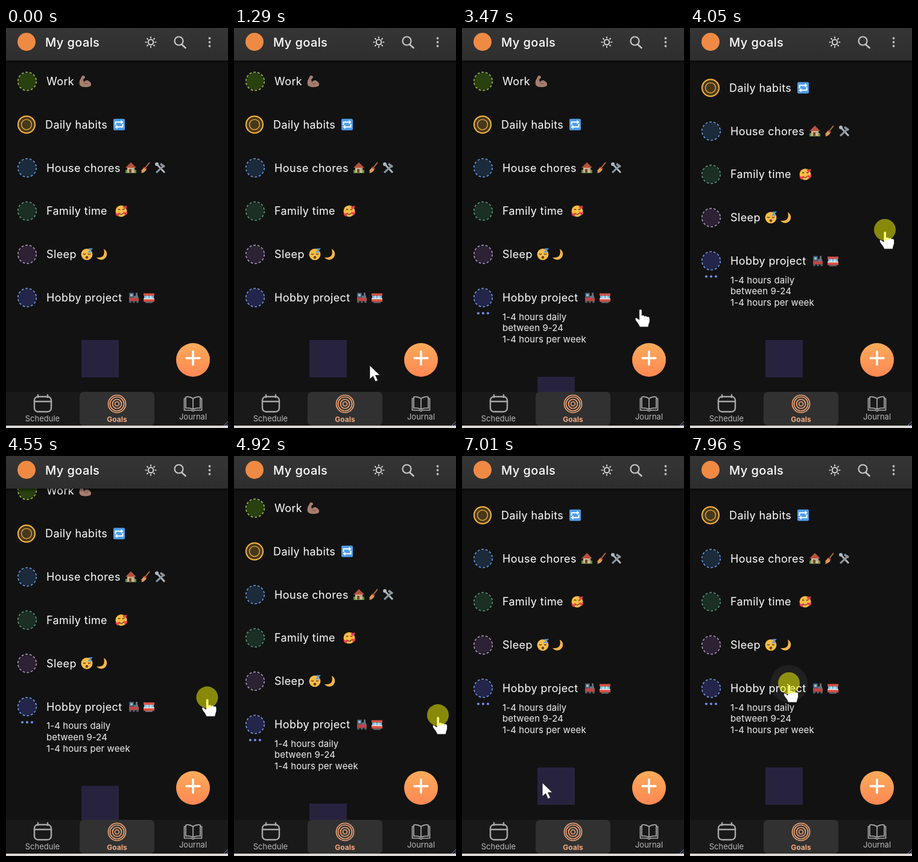
These frames come from a looping animation (368x664 px, 8000 ms). An HTML page:

```html
<!DOCTYPE html>
<html lang="en">
<head>
<meta charset="utf-8">
<title>My goals</title>
<style>
html, body { margin: 0; width: 100%; height: 100%; overflow: hidden; background: #121212; }
svg { display: block; width: 368px; height: 664px; }
text { font-family: Inter, "Open Sans", sans-serif; fill: #fff; }
.name { font-size: 18px; letter-spacing: .4px; }
.detail { font-size: 15px; letter-spacing: .1px; fill: #f0f0f0; }
.tab { font-size: 13px; fill: #b9b9b9; text-anchor: middle; }
.line { fill: none; stroke-linecap: round; stroke-linejoin: round; }
</style>
</head>
<body>
<svg viewBox="0 0 368 664">
  <defs>
    <linearGradient id="warm" x1="0" y1="0" x2="0" y2="1">
      <stop offset="0" stop-color="#fbab5a"/><stop offset="1" stop-color="#ff8753"/>
    </linearGradient>
    <linearGradient id="bar" x1="0" y1="0" x2="0" y2="1">
      <stop offset="0" stop-color="#353535"/><stop offset="1" stop-color="#2e2e2e"/>
    </linearGradient>
    <linearGradient id="shade" x1="0" y1="0" x2="0" y2="1">
      <stop offset="0" stop-color="#000" stop-opacity=".45"/><stop offset="1" stop-color="#000" stop-opacity="0"/>
    </linearGradient>
  </defs>
  <rect width="368" height="664" fill="#121212"/>
  <rect id="mark" x="125" y="518" width="62" height="62" fill="#27233f"/>
  <g id="list"></g>

  <circle cx="310" cy="551" r="28" fill="url(#warm)"/>
  <path class="line" d="M299 548H321M310 537V559" stroke="#fff" stroke-width="3.4"/>

  <rect y="54" width="368" height="6" fill="url(#shade)"/>
  <rect width="368" height="54" fill="url(#bar)"/>
  <circle cx="34" cy="23" r="15" fill="#ef8a45"/>
  <text x="65" y="31" font-size="20" font-weight="500" letter-spacing=".4">My goals</text>
  <g class="line" stroke="#eee" stroke-width="1.7">
    <circle cx="240" cy="23.5" r="4.3"/>
    <path id="rays"/>
  </g>
  <path class="line" d="M292 28L297.500 33" stroke="#c8c8c8" stroke-width="2.6"/>
  <circle class="line" cx="286.500" cy="21.500" r="7" stroke="#c8c8c8" stroke-width="2.2"/>
  <path class="line" d="M337.500 17v0M337.500 23.500v0M337.500 30v0" stroke="#bbb" stroke-width="3.800"/>

  <rect y="604" width="368" height="56" fill="#191919"/>
  <rect x="122" y="604" width="124" height="56" rx="7" fill="#313131"/>
  <g class="line" stroke="#a9a9a9" stroke-width="2.4">
    <rect x="47" y="612" width="28" height="25" rx="6"/>
    <path d="M47 620H75M53 609V613M69 609V613"/>
  </g>
  <g class="line" stroke="#f4a878" stroke-width="1.7">
    <circle cx="184" cy="624" r="14.5"/><circle cx="184" cy="624" r="11.5"/>
    <circle cx="184" cy="624" r="7.5"/><circle cx="184" cy="624" r="3.5"/>
  </g>
  <g class="line" stroke="#b0b0b0" stroke-width="1.6">
    <path d="M310 615Q304 611 298 612.500V631Q304 630 310 633Q316 630 322 631V612.500Q316 611 310 615V633"/>
    <path d="M298 615H295.500V634.500H307L310 636L313 634.500H324.500V615H322"/>
  </g>
  <text class="tab" x="60.500" y="653">Schedule</text>
  <text class="tab" x="184" y="654" style="font-size:12px;font-weight:700;fill:#f7aa80">Goals</text>
  <text class="tab" x="310" y="650">Journal</text>
  <path d="M361 660L368 653M365 660L368 657" stroke="#8589c8"/>
  <rect y="660" width="368" height="4" fill="#dcd8d6"/>

  <g id="cursor">
    <circle id="ripple" r="31" fill="#fff"/>
    <path id="arrow" d="M0 0V23L5.500 18L9.500 27L13.500 25L9.500 16.500H17Z" fill="#fff" stroke="#111" stroke-width=".8"/>
    <path id="hand" d="M-2 3Q0 0 2.500 3V12Q5 10 7 13Q9.500 11.500 11 14Q15 13 15.500 17V22Q14 26 13 31H-1Q-3 26 -8 20Q-10 15 -6 16L-2 19Z"
      fill="#fff" stroke="#111" stroke-width=".8"/>
    <circle id="press" cy="-1" r="18" fill="#ff0" fill-opacity=".5"/>
  </g>
</svg>
<script>
const $ = id => document.getElementById(id);

// Pictograms, each about 20px wide around its own centre
const face = '<circle r="9.500" fill="#f9bd45"/>';
const heart = (x, y) => `<path d="M${x} ${y + 3}l-3-3q-1-3 1.500-3l1.500 1.500l1.500-1.500q2.500 0 1.500 3z" fill="#ef3f4e"/>`;
const wheels = '<path d="M-6 7v0M0 7v0M6 7v0" stroke="#555f6b" stroke-width="4" stroke-linecap="round"/>';
const art = {
  arm: '<path d="M-6-9q5-2 5 3l-3 3l1 4q5-5 9-1q5 4 2 8q-6 3-14 1q-6-2-4-10z" fill="#a67d6e"/><path d="M-3 2q3 4 7 1" fill="none" stroke="#795448"/>',
  repeat: '<rect x="-9.500" y="-9.500" width="19" height="19" rx="2" fill="#4d9dea"/><path d="M-6 1v-5h10M6-1v5h-10" fill="none" stroke="#fff" stroke-width="2"/><path d="M3-7.500l4 3.500l-4 3.500zM-3 .5l-4 3.500l4 3.500z" fill="#fff"/>',
  house: '<path d="M-9 4q9-5 18 0v5h-18z" fill="#5d8f43"/><path d="M-6-1h12v9h-12z" fill="#d8b38a"/><path d="M-9 0l9-9l9 9z" fill="#b5533c"/><path d="M-3 2h4v6h-4z" fill="#6d4738"/><path d="M3 1h2v3h-2z" fill="#69a9c8"/>',
  broom: '<path d="M7-9l-8 10" stroke="#a86b42" stroke-width="2"/><path d="M-2-1l4 3q-2 6-9 7q2-3 0-4z" fill="#df9a55"/><path d="M-2-1l4 3" stroke="#c0473f" stroke-width="2"/>',
  tools: '<path d="M-7-7L7 8" stroke="#aeb9c2" stroke-width="3"/><path d="M6-4L-7 8" stroke="#8b97a1" stroke-width="3"/><path d="M1-8l7 5l-2 3l-7-5z" fill="#8b97a1"/><circle cx="-6" cy="-6" r="3" fill="#aeb9c2"/>',
  love: face + '<path d="M-5-2q2-2 3 0M2-2q2-2 3 0M-4 3q4 5 8 0" fill="none" stroke="#663d2b" stroke-width="1.500"/>' + heart(-6, 6) + heart(7, 4) + heart(6, -6),
  sleepy: face + '<path d="M-6-1q2 2 4 0M2-1q2 2 4 0" fill="none" stroke="#663d2b" stroke-width="1.300"/><circle cy="5" r="2.300" fill="#663d2b"/><path d="M3-9h5l-5 5h5" fill="none" stroke="#4d9dea" stroke-width="1.800"/>',
  moon: '<path d="M3-9A9.500 9.500 0 1 1-9 5Q7 7 3-9z" fill="#f6b64b"/>',
  train: '<path d="M-8-8h8v9h-8z" fill="#475768"/><path d="M-6-6h4v4h-4z" fill="#8ac0dc"/><path d="M-8 0h16v6h-16z" fill="#c24545"/><path d="M0-3h7v4h-7zM3-8h3v5h-3z" fill="#67727d"/>' + wheels,
  tram: '<path d="M-9-7h18v4h-18z" fill="#d95145"/><path d="M-8-3h16v5h-16z" fill="#80bfe3"/><path d="M-9 2h18v5h-18z" fill="#d95145"/><path d="M-9 2h18M-3-3v5M3-3v5" stroke="#eee" stroke-width="1.500"/><path d="M-6 8h12" stroke="#65717c" stroke-width="2"/>'
};

// name, fill, ring, pictograms with their x
const goals = [
  ['Work', '#29400f', '#94b54a', { arm: 132 }],
  ['Daily habits', '#46381a', '#f2ae3c', { repeat: 187.5 }],
  ['House chores', '#1c2b3b', '#5c93d8', { house: 207, broom: 231, tools: 256 }],
  ['Family time', '#1b2f24', '#519276', { love: 191 }],
  ['Sleep', '#2d2134', '#a68db8', { sleepy: 134, moon: 159 }],
  ['Hobby project', '#23254a', '#6c92e2', { train: 212, tram: 237 }]
];

function badge(i, fill, ring) {
  if (i === 1) return `<g fill="${fill}" stroke="${ring}"><circle cx="34" r="14" stroke-width="2.200"/><circle cx="34" r="8.500" stroke-width="1.300"/></g>`;
  return `<circle cx="35" r="14" fill="${fill}"/><circle cx="35" r="15.200" fill="none" stroke="${ring}" stroke-width="1.800" stroke-dasharray="4 2.820"/>`;
}

const row = ([name, fill, ring, icons], i) => `<g transform="translate(0 ${88.5 + 71.8 * i})">${badge(i, fill, ring)}
  <text class="name" x="${i === 1 ? 65 : 67}" y="6.500">${name}</text>
  ${Object.entries(icons).map(([key, x]) => `<g transform="translate(${x} 0)">${art[key]}</g>`).join('')}</g>`;

const details = ['1-4 hours daily', 'between 9-24', '1-4 hours per week'];
$('list').innerHTML = goals.map(row).join('') + `<g id="details">
  <path d="M27 473.500v0M35 473.500v0M43 473.500v0" stroke="#6f8ff5" stroke-width="4.200" stroke-linecap="round"/>
  ${details.map((s, i) => `<text class="detail" x="67" y="${484.5 + 18.8 * i}">${s}</text>`).join('')}</g>`;

$('rays').setAttribute('d', Array.from({ length: 8 }, (_, i) => {
  const a = i * Math.PI / 4, p = r => `${240 + r * Math.cos(a)} ${23.5 + r * Math.sin(a)}`;
  return `M${p(7)}L${p(8.6)}`;
}).join(''));

// Keys: time, then values
const path = [
  [510, 42, 662], [850, 150, 590], [1100, 228, 535], [1290, 225, 560], [1500, 228, 568],
  [1800, 105, 520], [2080, 165, 440], [2650, 165, 440], [2940, 190, 446], [3350, 285, 492],
  [3780, 323, 397], [3850, 323, 396], [4050, 323, 336], [4200, 325, 326], [4400, 330, 372],
  [4620, 335, 415], [4920, 338, 431], [5150, 338, 434], [5600, 324, 434], [5880, 323, 427],
  [6070, 323, 401], [6270, 323, 366], [6450, 315, 372], [7010, 133, 542], [7090, 141, 562],
  [7160, 141, 562], [7500, 180, 470], [7800, 164, 378]
];
const scroll = [[3850, 0], [4050, 61], [4400, 61], [4620, 18], [4920, 2], [5100, 0], [5880, 0], [6070, 26], [6270, 61], [6400, 62]];
const expand = [[2540, 0], [2840, 1]];
const ripple = [[2530, .06], [2760, 0]];
const presses = [[2360, 2570], [3840, 4230], [4390, 5060], [5860, 6290], [7840, 8000]];
const hands = [[2020, 6480], [7640, 8000]];

function at(keys, t) {
  const n = keys.findIndex(k => k[0] > t);
  if (n === 0) return keys[0].slice(1);
  if (n < 0) return keys[keys.length - 1].slice(1);
  const a = keys[n - 1], b = keys[n], u = (t - a[0]) / (b[0] - a[0]);
  return a.slice(1).map((v, i) => v + (b[i + 1] - v) * u);
}
const within = (spans, t) => spans.some(([a, b]) => t >= a && t < b);
const show = (id, on) => $(id).setAttribute('visibility', on ? 'visible' : 'hidden');
const move = (id, x, y) => $(id).setAttribute('transform', `translate(${x} ${y})`);

function draw(now) {
  const t = now % 8000;
  const [open] = at(expand, t), [top] = at(scroll, t), [x, y] = at(path, t);
  const hand = within(hands, t), visible = t >= 510;
  move('list', 0, -top);
  move('mark', 0, 61 * open - top);
  $('details').setAttribute('opacity', open);
  move('cursor', x, y);
  show('arrow', visible && !hand);
  show('hand', visible && hand);
  show('press', within(presses, t));
  show('ripple', t >= 2530 && t < 2760 || t >= 7940);
  $('ripple').setAttribute('opacity', t > 7000 ? .06 : at(ripple, t)[0]);
  requestAnimationFrame(draw);
}
draw(0);
</script>
</body>
</html>
```
